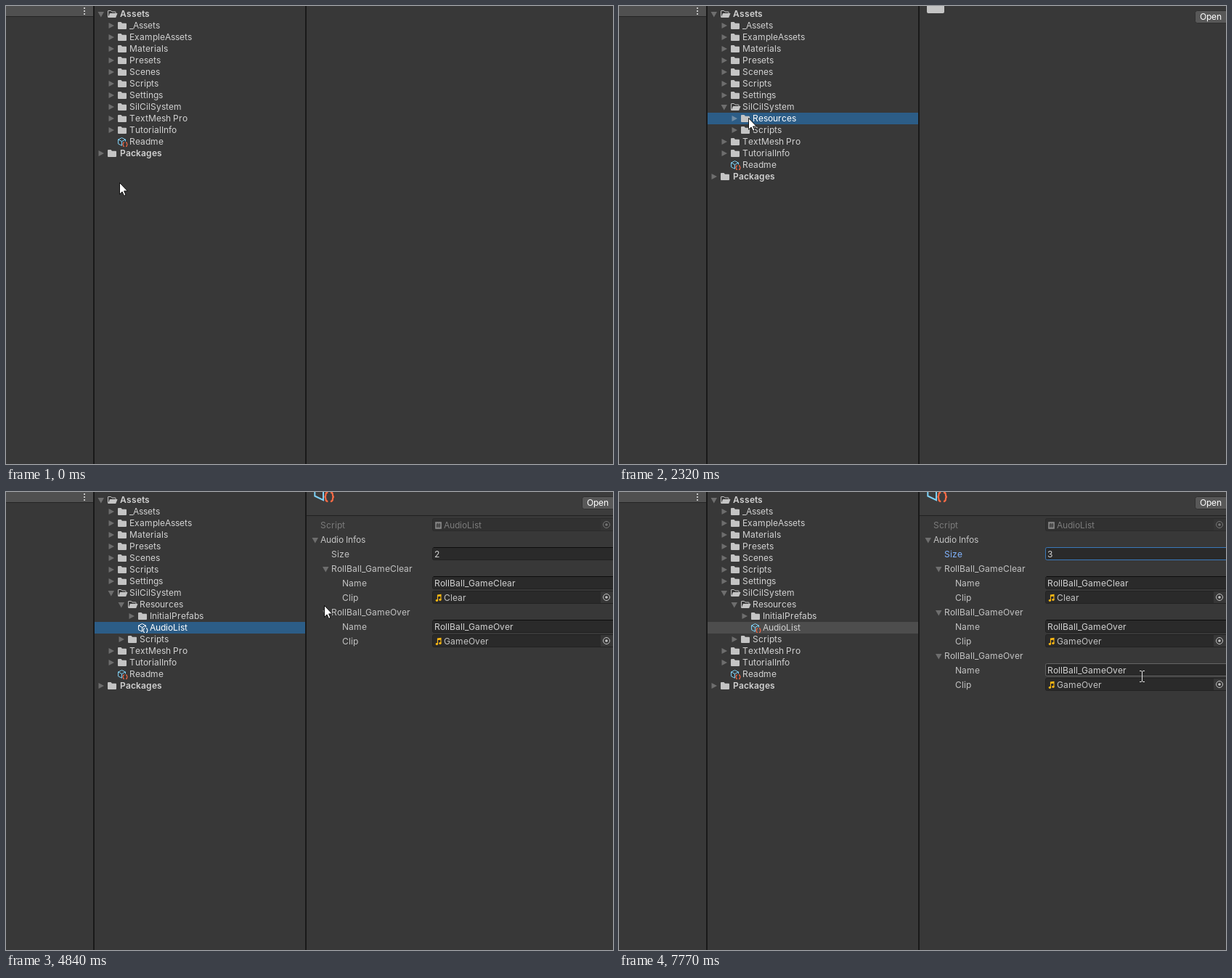
These frames come from a looping animation (836 by 631 pixels, 8000 ms). An HTML page:

```html
<!DOCTYPE html>
<html lang="en">
<head>
<meta charset="utf-8">
<title>Asset browser</title>
<style>
html, body { margin: 0; width: 100%; height: 100%; overflow: hidden; background: #383838; }
svg { display: block; }
text { font: 12px Inter, "Liberation Sans", sans-serif; font-kerning: none; fill: #d2d2d2; white-space: pre; }
.root { font-weight: 600; }
.label { fill: #c4c4c4; }
.dim { fill: #7b7b7b; }
.focus { fill: #81b4ff; }
.lit { fill: #fff; }
</style>
</head>
<body>
<svg width="836" height="631" viewBox="0 0 836 631">
  <rect width="836" height="631" fill="#383838"/>
  <rect width="120" height="14" fill="#505050"/>
  <rect y="14" width="120" height="1" fill="#242424"/>
  <g fill="#c4c4c4">
    <rect x="107" y="2" width="2" height="2"/>
    <rect x="107" y="6" width="2" height="2"/>
    <rect x="107" y="10" width="2" height="2"/>
  </g>
  <g id="tree"></g>
  <g id="panel"></g>
  <path d="M121 0V631M413 0V631" stroke="#191919" stroke-width="2"/>
  <path id="arrow" d="M.5 .5V16.3L4.1 12.9L6.6 18.4L9 17.4L6.6 11.9H11.4Z" fill="#fff" stroke="#000" stroke-width=".9"/>
  <path id="beam" d="M-3.5 .5H-1.5L0 1.5L1.5 .5H3.5M0 1.5V14.5M-3.5 15.5H-1.5L0 14.5L1.5 15.5H3.5" fill="none" stroke="#e4e4e4"/>
</svg>
<script>
const LOOP = 8000;
const T = {
  pickSystem: 840, openSystem: 1480, pickResources: 2220, openResources: 2960,
  pickList: 4160, showList: 4260, focus: 5790, type: 6610, enter: 6810
};

// Pointer legs: first step, last step, number of steps, end x, end y
const START = [156, 243];
const LEGS = [
  [100, 560, 6, 157, 140],
  [930, 1020, 2, 151, 139],
  [1110, 1200, 2, 144, 137],
  [1840, 2130, 4, 178, 154],
  [2420, 2600, 3, 172, 156],
  [2680, 2860, 3, 156, 151],
  [3140, 3420, 4, 177, 168],
  [3520, 3980, 6, 191, 189],
  [4620, 4840, 3, 438, 156],
  [4930, 5410, 6, 659, 90],
  [5510, 5510, 1, 659, 93],
  [5690, 5690, 1, 655, 94],
  [7390, 7770, 5, 720, 254]
];

const $ = id => document.getElementById(id);
const smooth = u => u * u * (3 - 2 * u);

function pointer(t) {
  let [x, y] = START;
  for (const [a, b, n, ex, ey] of LEGS) {
    if (t < a) break;
    const gap = n > 1 ? (b - a) / (n - 1) : 1;
    const k = Math.min(n, Math.floor((t - a) / gap + 0.001) + 1);
    const u = smooth(k / n);
    x += (ex - x) * u;
    y += (ey - y) * u;
  }
  return [Math.round(x), Math.round(y)];
}

// Glyphs advance by whole pixels, as in hinted interface text
const ruler = document.createElement("canvas").getContext("2d");
function snap(x, s, weight) {
  ruler.font = `${weight} 12px Inter, "Liberation Sans", sans-serif`;
  return [...s].map(c => {
    const at = x;
    x += Math.round(ruler.measureText(c).width);
    return at;
  }).join(" ");
}

const text = (x, y, s, cls = "") =>
  `<text x="${snap(x, s, cls.includes("root") ? 600 : 400)}" y="${y + 4}" class="${cls}">${s}</text>`;
const rect = (x, y, w, h, fill, more = "") =>
  `<rect x="${x}" y="${y}" width="${w}" height="${h}" fill="${fill}" ${more}/>`;
const path = (x, y, d, style) => `<path transform="translate(${x} ${y})" d="${d}" ${style}/>`;
const line = (color, width = 1) => `fill="none" stroke="${color}" stroke-width="${width}"`;

const fold = (x, y, open, color = "#6e6e6e") =>
  path(x, y, open ? "M-4 -3H4.5L.3 4.5Z" : "M-3 -4L4.5 0L-3 4Z", `fill="${color}"`);

const folder = (x, y, open) => open
  ? path(x, y, "M.5 4.5V-4Q.5 -4.5 1 -4.5H4.5L6 -3H10.5Q11 -3 11 -2.5V-1", line("#c4c4c4")) +
    path(x, y, "M3 -1H13.5L11.2 5H.5Z", 'fill="#c4c4c4"')
  : path(x, y, "M0 -4Q0 -5 1 -5H4.5L6 -3.2H11Q12 -3.2 12 -2.2V4Q12 5 11 5H1Q0 5 0 4Z", 'fill="#c4c4c4"');

const BRACES = "M2.5 0Q1 0 1 1.3Q1 2.8 0 2.8Q1 2.8 1 4.3Q1 5.6 2.5 5.6M4.5 0Q6 0 6 1.3Q6 2.8 7 2.8Q6 2.8 6 4.3Q6 5.6 4.5 5.6";

const asset = (x, y, lit) =>
  path(x, y, "M5.5 5.3L.5 2.8V-3L5.5 -5.5L10.5 -3V-.5M.5 -3L5.5 -.5L10.5 -3M5.5 -.5V5.3", line(lit ? "#fff" : "#7fd0f5")) +
  path(x + 6.5, y + 0.9, BRACES, line(lit ? "#fff" : "#ff6b45", 1.1));

function tree(t) {
  const sys = t >= T.openSystem, res = t >= T.openResources;
  const rows = [[0, "Assets", true]];
  const add = (depth, names) => names.forEach(n => rows.push([depth, n]));
  add(1, ["_Assets", "ExampleAssets", "Materials", "Presets", "Scenes", "Scripts", "Settings"]);
  rows.push([1, "SilCilSystem", sys]);
  if (sys) {
    rows.push([2, "Resources", res]);
    if (res) add(3, ["InitialPrefabs", "AudioList"]);
    add(2, ["Scripts"]);
  }
  add(1, ["TextMesh Pro", "TutorialInfo", "Readme"]);
  add(0, ["Packages"]);

  const picked = t >= T.pickList ? "AudioList" : t >= T.pickResources ? "Resources"
    : t >= T.pickSystem ? "SilCilSystem" : "";
  const active = t < T.focus;

  return rows.map(([depth, name, open], i) => {
    const y = 11 + 16 * i, x = 140 + 14 * depth;
    const on = name === picked, lit = on && active;
    const leaf = name === "AudioList" || name === "Readme";
    return (on ? rect(122, y - 8, 290, 16, active ? "#2c5d87" : "#4d4d4d") : "") +
      (leaf ? asset(x, y, lit) : fold(x - 9.5, y, open, lit ? "#6f8ca5" : undefined) + folder(x, y, open)) +
      text(x + (depth ? 16 : 17), y, name, (depth ? "" : "root") + (lit ? " lit" : ""));
  }).join("");
}

const box = (y, fill, edge) => rect(587.5, y - 9.5, 252, 17, fill, `rx="2" stroke="${edge}"`);

const field = (y, s, edge) =>
  box(y, "#2a2a2a", edge || "#212121") +
  (edge ? "" : rect(589, y - 10, 247, 1, "#0d0d0d")) + text(590, y, s);

const note = y => `<g transform="translate(591.3 ${y - 4.5})" fill="#fdb913">
  <path d="M2.6 0L8.2 -.7V7H7.1V2.2L3.7 2.6V8H2.6Z"/>
  <ellipse cx="2.1" cy="8" rx="1.7" ry="1.4"/><ellipse cx="6.6" cy="7" rx="1.7" ry="1.4"/></g>`;

const badge = y => rect(591, y - 5, 9, 10, "#7d7d7d", 'rx="1"') +
  path(592.5, y - 3, "M2 0L1.5 6M4.5 0L4 6M0 2H6M0 4H6", line("#333", 0.9));

function picker(y, s, dim) {
  const ink = dim ? "#777" : "#c4c4c4";
  return box(y, dim ? "#313131" : "#2a2a2a", dim ? "#2b2b2b" : "#222") +
    rect(819, y - 9, 17, 16, dim ? "#353535" : "#373737") +
    `<circle cx="827" cy="${y - 1}" r="4.5" ${line(ink)}/><circle cx="827" cy="${y - 1}" r="1.8" fill="${ink}"/>` +
    (dim ? badge(y) : note(y)) + text(603, y, s, dim ? "dim" : "label");
}

const entry = (y, name, clip, hover) =>
  fold(440, y, true) + text(448, y, "RollBall_" + name, "label") +
  text(463, y + 20, "Name", "label") + field(y + 20, "RollBall_" + name, hover === y + 20 && "#656565") +
  text(463, y + 40, "Clip", "label") + picker(y + 40, clip);

function sizeField(t, hover) {
  const focus = t >= T.focus, typed = t >= T.type;
  const edge = focus ? "#3a79bb" : hover === 86 && "#656565";
  let s = text(448, 86, "Size", focus ? "focus" : "label") + field(86, typed ? "3" : "2", edge);
  if (focus && !typed) s += rect(590, 78, 8, 15, "#3d80df", 'opacity=".6"') + text(590, 86, "2");
  if (typed && t < T.enter) s += rect(598, 79, 1, 14, "#d2d2d2");
  return s;
}

function panel(t, hover) {
  if (t < T.pickSystem) return "";
  const button = rect(793.5, 6.5, 50, 17, "#585858", 'rx="3" stroke="#303030"') + text(800, 15, "Open", "lit");
  if (t < T.showList) return rect(424, -5, 24, 15, "#c4c4c4", 'rx="2"') + button;
  return rect(414, 0, 422, 32, "#3c3c3c") + rect(414, 32, 422, 1, "#212121") +
    path(424, 0, "M1.3 -1V5.5L13 11.2V-1", line("#7fd0f5", 2)) +
    rect(438, -1, 14, 15, "#3c3c3c") +
    `<g transform="translate(438.5 .6) scale(1.9 2.2)">${path(0, 0, BRACES, line("#ff6b45", 1.1))}</g>` +
    button +
    text(433, 46, "Script", "dim") + picker(46, "AudioList", true) +
    fold(425.5, 66, true) + text(433, 66, "Audio Infos", "label") +
    sizeField(t, hover) +
    entry(106, "GameClear", "Clear", hover) +
    entry(166, "GameOver", "GameOver", hover) +
    (t >= T.enter ? entry(226, "GameOver", "GameOver", hover) : "");
}

const shown = {};
function put(id, html) {
  if (shown[id] !== html) $(id).innerHTML = shown[id] = html;
}

function draw(t) {
  const [x, y] = pointer(t);
  const inputs = t >= T.showList ? [86, 126, 186] : [];
  if (t >= T.enter) inputs.push(246);
  const hover = x >= 587 ? inputs.find(c => y >= c - 10 && y < c + 9) : undefined;
  put("tree", tree(t));
  put("panel", panel(t, hover));
  $("arrow").setAttribute("transform", `translate(${x} ${y})`);
  $("beam").setAttribute("transform", `translate(${x + 0.5} ${y - 8})`);
  $("arrow").setAttribute("visibility", hover ? "hidden" : "visible");
  $("beam").setAttribute("visibility", hover ? "visible" : "hidden");
}

const begin = performance.now();
function tick() {
  draw((performance.now() - begin) % LOOP);
  requestAnimationFrame(tick);
}
tick();
</script>
</body>
</html>
```
